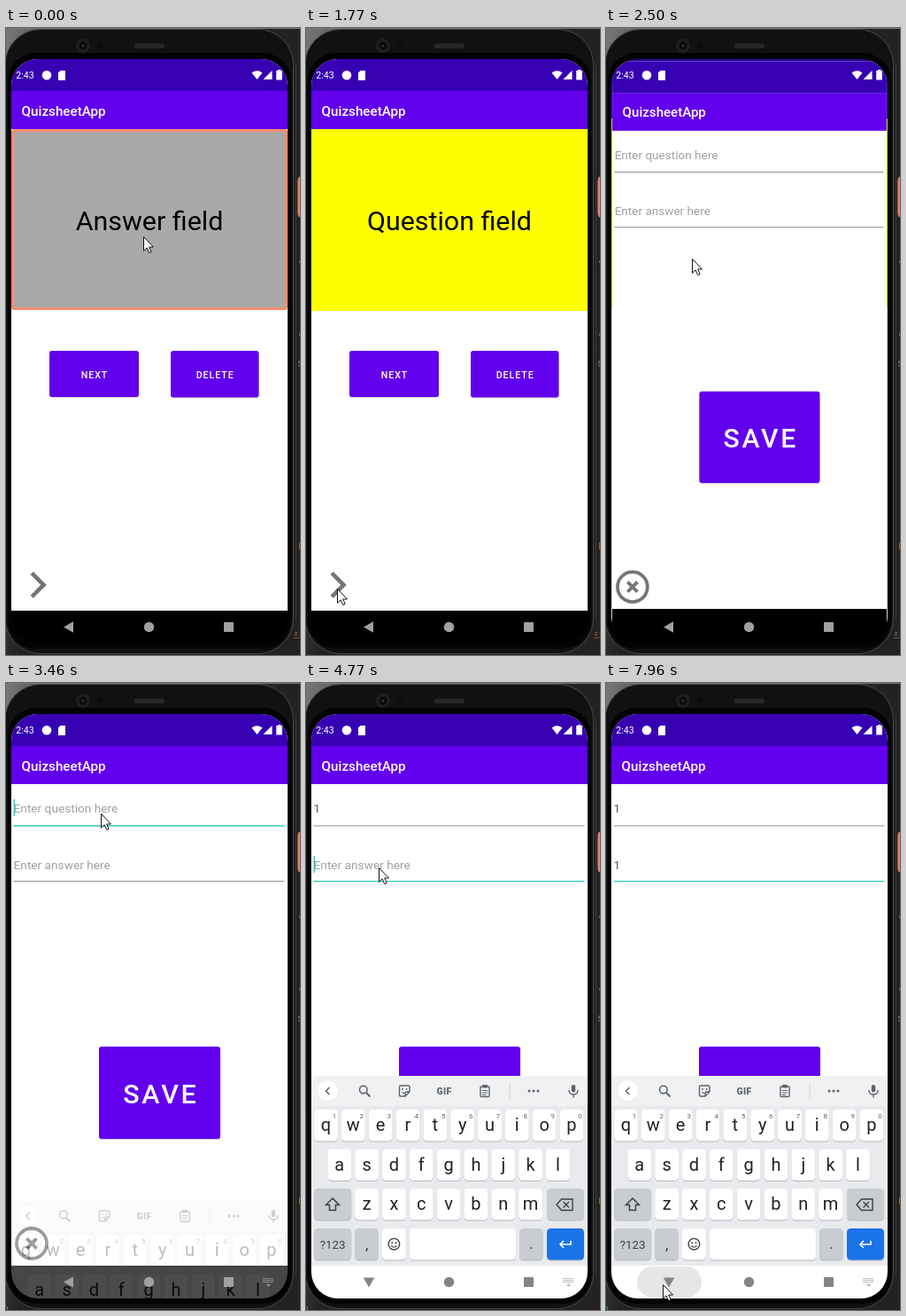
Write an HTML page that moves like this. It is 332 by 707 pixels and loops after 8000 ms.

```html
<!DOCTYPE html>
<html lang="en">
<head>
<meta charset="utf-8">
<title>QuizsheetApp</title>
<style>
html, body { margin: 0; width: 100%; height: 100%; overflow: hidden; background: #232323; }
svg { display: block; width: 332px; height: 707px; font-family: Roboto, sans-serif; }
</style>
</head>
<body>
<svg id="stage" viewBox="0 0 332 707" xmlns="http://www.w3.org/2000/svg"></svg>
<script>
const LOOP = 8000;
const PURPLE = '#6200ee', TEAL = '#2fcdbd', ICON = '#5f6368';

const rect = (x, y, w, h, fill, rx = 0, more = '') =>
  `<rect x="${x}" y="${y}" width="${w}" height="${h}" rx="${rx}" fill="${fill}" ${more}/>`;
const circle = (x, y, r, fill, more = '') =>
  `<circle cx="${x}" cy="${y}" r="${r}" fill="${fill}" ${more}/>`;
const line = (d, color, w = 1.4, more = '') =>
  `<path d="${d}" fill="none" stroke="${color}" stroke-width="${w}" ${more}/>`;
const shape = (d, fill, more = '') => `<path d="${d}" fill="${fill}" ${more}/>`;
const text = (s, x, y, size, fill, more = '') =>
  `<text x="${x}" y="${y}" font-size="${size}" fill="${fill}" ${more}>${s}</text>`;
const mid = 'text-anchor="middle"';
const group = (id, body, more = '') => `<g id="${id}" ${more}>${body}</g>`;

function device() {
  return `<linearGradient id="desk" x2=".35" y2=".12"><stop stop-color="#777"/><stop offset="1" stop-color="#222"/></linearGradient>` +
    rect(0, 0, 332, 707, 'url(#desk)') +
    rect(-1, 1.5, 325.5, 704, '#111112', 40, 'stroke="#48484a"') +
    rect(2, 28, 320, 672, '#030303', 32) +
    line('M327.5 40V668', '#39393b', 1) +
    line('M0 .5H332', '#77777a', 1) +
    circle(87, 20, 8, '#1f1f21') + circle(87, 20, 4.5, '#0b0b0d') + circle(87, 20, 1.6, '#333336') +
    circle(106, 20, 3.5, '#0c0c0e') +
    rect(145, 17.5, 34, 5.5, '#272729', 2.7) +
    shape('M332 167.5Q329.300 168 329.300 174V207Q329.300 213 332 213.5Z', '#e0816c') +
    rect(331, 262, 1, 3, '#666') + rect(331, 344, 1, 3, '#666') +
    text('S', 329.5, 381.5, 9, '#9c945c') +
    rect(331, 580, 1, 8, '#a5631b') +
    group('markA', text('z', 325.5, 685, 8, '#a06f4a') + line('M325 687.5H331', '#7a5138', 1)) +
    group('markB', text('1', -1, 708, 8, '#4ba99b'));
}

function bars() {
  return rect(6, 35, 312, 36, '#3700b3') + rect(6, 71, 312, 43, PURPLE) +
    text('QuizsheetApp', 17.6, 98.5, 15.2, '#fff', 'font-weight="500"');
}

// a window: white sheet, title bars and its own black navigation strip
const sheet = () =>
  rect(6, 35, 312, 622, '#fff') + rect(6, 657, 312, 50, '#000') + bars();

function button(label, x, y, w, h, size, base) {
  const gap = size * .0892;
  return rect(x, y + 1, w, h, '#000', 3, 'opacity=".2"') + rect(x, y, w, h, PURPLE, 3) +
    text(label, x + w / 2 + gap / 2, base, size, '#fff',
      `${mid} font-weight="500" letter-spacing="${gap}"`);
}

function cardPage() {
  return sheet() +
    group('answer', rect(7.5, 115.5, 309, 201, '#a9a9a9', 2, 'stroke="#fb8c6f" stroke-width="3"') +
      text('Answer field', 162, 228, 30.4, '#000', mid)) +
    group('question', rect(6, 114, 312, 205, '#ff0') +
      text('Question field', 162, 228, 30.4, '#000', mid)) +
    button('NEXT', 49, 364, 101, 52, 10.63, 395) +
    button('DELETE', 186, 364, 99.5, 52.5, 10.63, 395) +
    line('M29.2 614.7L42.5 628L29.2 641.3', '#757575', 4.6);
}

function field(id, hint, base, lineY) {
  return group(id + 'Hint', text(hint, 8.6, base, 13.66, '#a0a0a0')) +
    group(id + 'Text', text('1', 8.6, base, 13.66, '#555')) +
    `<path id="${id}Line" d="M8.5 ${lineY}H314.5"/>` +
    `<rect id="${id}Caret" y="${base - 15}" width="1.5" height="19" fill="${TEAL}"/>`;
}

function editPage() {
  return sheet() +
    field('q', 'Enter question here', 146, 161) +
    field('a', 'Enter answer here', 210, 223.6) +
    group('compose', line('M9 212.5H16', '#555', 1)) +
    button('SAVE', 105, 410, 137, 104, 30.4, 473.5) +
    circle(29, 632, 17, 'none', 'stroke="#757575" stroke-width="3.8"') +
    line('M23.4 626.4L34.6 637.6M34.6 626.4L23.4 637.6', '#757575', 3.8);
}

function key(x, y, w, fill) {
  return rect(x, y + 1, w, 35.5, '#b4b8bd', 4.5) + rect(x, y, w, 35.5, fill, 4.5);
}

function letters(row, x0, y, digits) {
  return [...row].map((c, i) => {
    const x = x0 + i * 30.83;
    return key(x - 13.4, y, 26.8, '#fff') +
      text(c, x, y + 24.3, 20, '#202124', mid) +
      (digits ? text((i + 1) % 10, x + 9.5, y + 9.5, 8, ICON, mid) : '');
  }).join('');
}

function toolbar() {
  const tools =
    circle(64.8, 458.6, 4.3, 'none', `stroke="${ICON}" stroke-width="1.6"`) +
    line('M68 462L72.5 466.5', ICON, 1.9) +
    line('M107 454H115.5Q117 454 117 455.5V461L112 466H107Q105.5 466 105.5 464.5V455.5Q105.5 454 107 454ZM117 461H113.5Q112 461 112 462.5V466', ICON) +
    circle(109, 458, .9, ICON) + circle(113.6, 458, .9, ICON) + line('M108.5 461.5Q110 463 111.5 462', ICON, 1.1) +
    text('GIF', 156, 463.6, 10.4, ICON, mid + ' font-weight="900" letter-spacing=".4"') +
    rect(197, 455, 10, 11.5, 'none', 1, `stroke="${ICON}" stroke-width="1.4"`) +
    rect(199, 453, 6, 3.6, ICON, 1) +
    line('M199 459.5H205M199 462H205M199 464.3H203', ICON, 1) +
    line('M230 451V469', '#d3d6da', 1) +
    [252, 257, 262].map(x => circle(x, 460, 1.5, ICON)).join('');
  return circle(24.5, 460.7, 11.5, '#d6d9dc') + circle(24.5, 460, 11.5, '#fff') +
    line('M26.5 456L22.5 460L26.5 464', ICON, 1.5) +
    group('tools', tools) +
    group('strip', line('M118 452V468M202 452V468', '#d3d6da', 1)) +
    rect(299.8, 453, 4.4, 8.5, ICON, 2.2) +
    line('M297 459Q297 464 302 464Q307 464 307 459M302 464V467.5', ICON, 1.4);
}

function keyboard() {
  const grey = '#c9cdd2';
  return rect(6, 443, 312, 215, '#e8eaed') + rect(6, 443, 312, 34, '#eff1f3') +
    rect(6, 657, 312, 50, '#fff') + toolbar() +
    letters('qwertyuiop', 22.5, 481, true) +
    letters('asdfghjkl', 37.8, 525.5) +
    letters('zxcvbnm', 68.6, 570) +
    key(9.2, 570, 42, grey) + key(272, 570, 42, grey) +
    line('M30 581L37.5 588.5H33.5V594.5H26.5V588.5H22.5Z', '#3c4043', 1.5) +
    line('M288.5 582H301V594.5H288.5L283 588.2Z', '#3c4043', 1.4) +
    line('M290.5 585L297 591.5M297 585L290.5 591.5', '#3c4043', 1.4) +
    key(9.2, 615, 42, grey) + text('?123', 30.2, 638, 13.4, '#3c4043', mid) +
    key(55.2, 615, 26.8, grey) + text(',', 68.6, 639, 17, '#3c4043', mid) +
    key(86, 615, 26.8, '#fff') +
    circle(99.4, 632.7, 6.3, 'none', 'stroke="#3c4043" stroke-width="1.4"') +
    circle(97.3, 631.2, 1, '#3c4043') + circle(101.5, 631.2, 1, '#3c4043') +
    line('M96.3 634.3Q99.4 638 102.5 634.3', '#3c4043', 1.3) +
    key(116.9, 615, 120, '#fff') +
    key(241, 615, 26.8, grey) + text('.', 254.4, 638, 17, '#3c4043', mid) +
    key(272, 615, 42, '#1a73e8') +
    line('M299 629V633H287M291 629L287 633L291 637', '#fff', 1.6);
}

function navIcons() {
  let dots = '';
  for (let r = 0; r < 3; r++)
    for (let c = 0; c < 6; c++) dots += rect(290.5 + c * 2, 671 + r * 2, 1.2, 1.2, '#a2a2a2');
  return rect(35, 658, 73, 35, '#e6e6e6', 17.5, 'id="ripple"') +
    group('nav', '<path id="back" d="M65 675.5L76 669.2V681.8Z"/>' +
      '<circle cx="161.5" cy="675.5" r="5.7"/><rect x="246" y="670" width="11" height="11" rx=".7"/>') +
    group('ime', dots + shape('M294 678.3H299L296.5 680.5Z', '#a2a2a2'));
}

function statusIcons() {
  return text('2:43', 11.3, 57.3, 10.6, '#fff') +
    circle(46, 53.3, 5.3, '#fff') +
    shape('M61.5 48H67V59H59V50.5Z', '#fff') +
    shape('M277.5 50.5Q283.5 45.8 289.5 50.5L283.5 58Z', '#fff') +
    shape('M300.5 48V58H290.5Z', '#fff') +
    shape('M307 48V47H310V48H311.8V58.5H305.2V48Z', '#fff');
}

document.getElementById('stage').innerHTML =
  `<clipPath id="screen">${rect(6, 35, 312, 659, '#fff', 30)}</clipPath>` + device() +
  `<g clip-path="url(#screen)">` + rect(6, 35, 312, 659, '#000') +
  group('card', cardPage()) +
  group('edit', editPage()) +
  group('board', keyboard()) + navIcons() + statusIcons() + '</g>' +
  group('pointer', shape('M.5 .5V16.3L4.1 12.9L6.7 18.6L9.2 17.5L6.7 12H11.5Z', '#fff',
    'stroke="#111" stroke-width="1" stroke-linejoin="round"'));

const el = {};
document.querySelectorAll('[id]').forEach(n => el[n.id] = n);
const set = (id, name, v) => el[id].setAttribute(name, v);
const show = (id, on) => set(id, 'display', on ? 'inline' : 'none');
const clamp = v => Math.max(0, Math.min(1, v));
const within = (t, a, b) => t >= a && t < b;
const stepped = (t, start, last) =>
  Math.min(last, start + Math.floor((t - start) / 120) * 120);
const zoom = (id, s) =>
  set(id, 'transform', `translate(162 375) scale(${s}) translate(-162 -375)`);

// time, x, y: the pointer rests until the next stop
const stops = [
  [0, 155, 235], [1140, 149, 262], [1260, 112, 380], [1380, 64, 525], [1500, 39, 599],
  [1650, 37, 620], [1770, 35, 632], [2260, 40, 600], [2380, 71, 420], [2500, 97, 260],
  [2650, 99, 225], [2800, 103, 165], [2950, 107, 147], [4380, 104, 152], [4530, 95, 177],
  [4650, 85, 202], [4770, 82, 208], [6840, 87, 247], [6990, 87, 267], [7240, 83, 427],
  [7390, 70, 545], [7510, 57, 657], [7660, 57, 669], [7810, 64, 678]
];

function underline(id, focused) {
  set(id, 'stroke', focused ? TEAL : '#8c8c8c');
  set(id, 'stroke-width', focused ? 1.3 : 1);
}

function draw(t) {
  const [, px, py] = stops.filter(s => s[0] <= t).pop();
  set('pointer', 'transform', `translate(${px} ${py})`);

  show('answer', t < 740);
  show('question', t >= 740);

  // page change
  const q = stepped(t, 2140, 2500);
  const open = t >= 2650 ? 1 : t < 2140 ? 0 : 1 - Math.exp(-(q - 2040) / 150);
  show('card', open < 1);
  show('edit', open > 0);
  zoom('card', 1 + .047 * open);
  zoom('edit', .85 + .15 * open);
  set('card', 'opacity', 1 - .2 * open);
  set('edit', 'opacity', open ? clamp((q - 2040) / 150) : 0);

  // fields
  const typedQ = t >= 3850, typedA = t >= 5140;
  const onQ = within(t, 3100, 4770), onA = t >= 4770;
  show('qHint', !typedQ);
  show('qText', typedQ);
  show('aHint', !typedA);
  show('aText', typedA);
  underline('qLine', onQ);
  underline('aLine', onA);
  set('qCaret', 'x', typedQ ? 16 : 8.6);
  set('aCaret', 'x', typedA ? 16 : 8.6);
  show('qCaret', within(t, 3100, 4380));
  show('aCaret', within(t, 4770, 5950) || within(t, 6190, 6720) || within(t, 7240, 7660));
  const composing = within(t, 5390, 5950);
  show('compose', composing);
  show('strip', composing);
  show('tools', !composing);

  // keyboard slide
  const rise = clamp((stepped(t, 3100, 3700) - 3220) / 480);
  show('board', rise > 0);
  set('board', 'transform', `translate(0 ${282 * (1 - rise)})`);
  set('board', 'opacity', rise ** 1.74);
  show('ime', rise > 0);
  set('nav', 'fill', rise === 1 ? '#848484' : '#a0a0a0');
  const turn = t >= 3850 ? 90 : 75 * clamp((rise - .5) * 2);
  set('back', 'transform', `rotate(${-turn} 71 675.5)`);
  show('ripple', t >= 7960);
  show('markA', t < 3100);
  show('markB', t >= 3100);
}

function tick() {
  draw(performance.now() % LOOP);
  requestAnimationFrame(tick);
}
tick();
</script>
</body>
</html>
```
